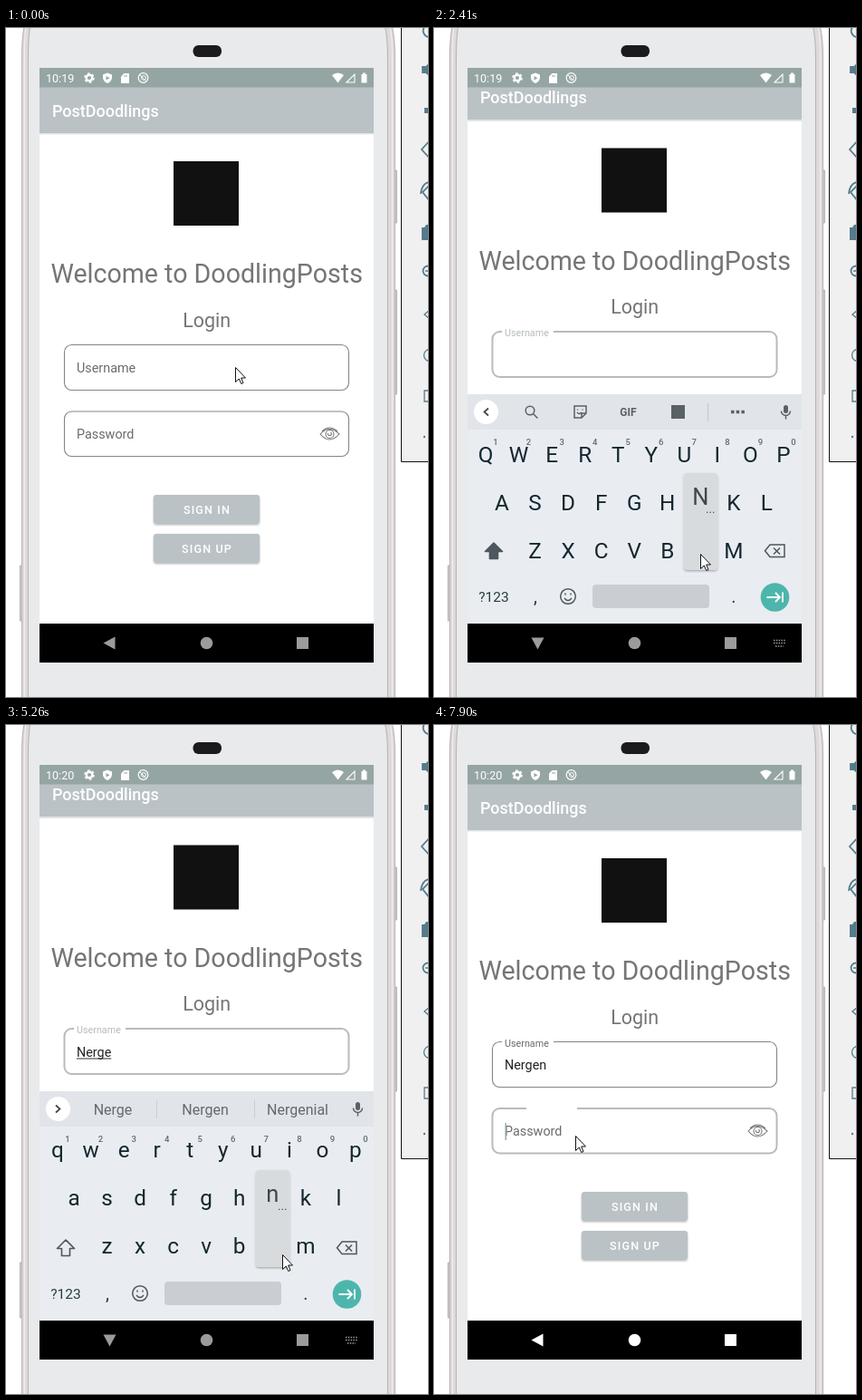
An HTML page that plays this animation: 466x738 px, repeating every 8 s.

```html
<!DOCTYPE html>
<html lang="en">
<head>
<meta charset="utf-8">
<title>Login demo</title>
<style>
html, body { margin: 0; width: 100%; height: 100%; overflow: hidden; background: #fff; }
svg { display: block; width: 466px; height: 738px; font-family: Roboto, sans-serif; }
.mid { text-anchor: middle; }
.line { fill: none; stroke-width: 1.5; }
</style>
</head>
<body>
<svg viewBox="0 0 466 738">
  <defs>
    <clipPath id="screenClip"><rect x="37" y="65" width="369" height="592"/></clipPath>
    <clipPath id="glassClip"><rect x="37" y="44" width="369" height="656"/></clipPath>
    <filter id="shadow" x="-20%" y="-20%" width="140%" height="150%">
      <feDropShadow dx="0" dy="1.2" stdDeviation="1" flood-opacity=".3"/>
    </filter>
  </defs>

  <!-- phone body -->
  <path d="M20 -3Q17 10 17 34V740H430V34Q430 10 426 -3Z" fill="#dedadb"/>
  <path d="M27 -3Q25 8 25 34V740H421V34Q421 8 418 -3Z" fill="#e8eaec"/>
  <g class="line" stroke="#b9b1b3" style="stroke-width:1">
    <path d="M20.500 -3Q17.500 10 17.500 34V740M27 -3Q24.500 8 24.500 34V740M418 -3Q421.500 8 421.500 34V740M426 -3Q429.500 10 429.500 34V740"/>
    <path d="M22 -3Q20.500 10 20.500 34V740M424 -3Q426.500 10 426.500 34V740" stroke="#f3f0f1"/>
    <path d="M17 593h-1.500v61h1.500M430 157h1.500v58h-1.500M430 289h1.500v115h-1.500" fill="#d0cacc"/>
  </g>
  <rect x="206.500" y="19" width="31.500" height="13" rx="6" fill="#1b1b1d"/>

  <!-- emulator side panel -->
  <path d="M436.500 -1V478.500H467V-1Z" fill="#f0f0f0" stroke="#111"/>
  <g fill="none" stroke="#557b8d" stroke-width="1.800">
    <path d="M462 -1A7 7 0 0 0 467 10"/>
    <path d="M460 43h4l4-4v14l-4-4h-4z" fill="#557b8d"/>
    <path d="M462 88h6v6h-6z" fill="#557b8d" stroke="none"/>
    <path d="M468 124L459 134L468 144M468 173L460 181L468 191M458 183Q459 172 467 170"/>
    <path d="M459 220h3l2-3h5v17h-10z" fill="#557b8d" stroke="none"/>
    <circle cx="466" cy="268" r="5.500"/>
    <path d="M463 268h6M468 311L462 316L468 321" stroke-width="1.300"/>
    <circle cx="468" cy="361" r="6.500" stroke-width="1.300"/>
    <path d="M469 400h-7v12h7" stroke-width="1.300"/>
    <circle cx="462" cy="451" r="1.200" fill="#557b8d" stroke="none"/>
  </g>

  <!-- page -->
  <rect x="37" y="44" width="369" height="614" fill="#fff"/>
  <g clip-path="url(#screenClip)"><g id="page">
    <rect x="37" y="60" width="369" height="56" fill="#bac2c6"/>
    <rect x="37" y="116" width="369" height="1.500" fill="#e3e6e8"/>
    <text x="51" y="97.500" font-size="17.960" font-weight="500" fill="#fff">PostDoodlings</text>
    <rect x="185" y="147" width="72" height="71" fill="#111"/>
    <g class="mid" fill="#757575">
      <text x="221.700" y="281" font-size="28.600">Welcome to DoodlingPosts</text>
      <text x="221.700" y="329.500" font-size="21.500">Login</text>
    </g>
    <rect id="userBox" x="64.500" y="349.500" width="314" height="50" rx="8" fill="none"/>
    <rect id="userGap" x="75" y="346" width="57" height="6" fill="#fff"/>
    <text id="userLabel" x="78">Username</text>
    <text id="typed" x="78" y="380" font-size="14.360" fill="#222"></text>
    <rect id="underline" x="78" y="382" height="1" fill="#333"/>
    <rect id="passBox" x="64.500" y="423" width="314" height="49.500" rx="8" fill="none"/>
    <rect id="passGap" x="102" y="420" width="56" height="6" fill="#fff"/>
    <text x="78" y="453" font-size="14.360" fill="#6b6b6b">Password</text>
    <g class="line" stroke="#777" style="stroke-width:1.100">
      <path d="M347 448Q357 437 368 448Q357 460 347 448ZM349 445Q357 437 366 445"/>
      <circle cx="357.500" cy="448" r="4.500"/><path d="M355.500 447a2 2 0 1 0 3-1"/>
    </g>
    <rect id="caret" width="1.400" height="19" fill="#8fa3ad"/>
    <g filter="url(#shadow)" fill="#bac2c6">
      <rect x="163" y="515" width="117" height="32" rx="3"/>
      <rect x="163" y="558" width="117" height="32" rx="3"/>
    </g>
    <g class="mid" font-size="12.570" font-weight="500" letter-spacing="1.120" fill="#fff">
      <text x="222" y="536">SIGN IN</text><text x="222" y="579">SIGN UP</text>
    </g>
  </g></g>

  <!-- status bar -->
  <rect x="37" y="44" width="369" height="21.500" fill="#95a5a3"/>
  <g fill="#fff">
    <text id="clock" x="44" y="59.500" font-size="12.570"></text>
    <circle cx="92" cy="55" r="3.300" fill="none" stroke="#fff" stroke-width="2.400"/>
    <circle cx="92" cy="55" r="5" fill="none" stroke="#fff" stroke-width="1.600" stroke-dasharray="2.600 2.636"/>
    <path d="M112 49.500l5 2v3.500q-.5 4-5 6q-4.500-2-5-6v-3.500z"/>
    <path d="M110.500 53l4 2.200l-4 2.200z" fill="#95a5a3"/>
    <path d="M130.500 50h5.500v11h-9v-7.500z"/><path d="M131 52v2M133 52v2" stroke="#95a5a3"/>
    <circle cx="151.500" cy="55" r="5.300" fill="none" stroke="#fff" stroke-width="1.200"/>
    <path d="M148 52l6 6" stroke="#fff"/><circle cx="152" cy="55" r="2.400" fill="none" stroke="#fff"/>
    <path d="M360 52q6.500-5 13 0l-6.500 8.500z"/>
    <path d="M376 60l9-9v9z" fill="none" stroke="#fff" stroke-width="1.100"/>
    <path d="M392.500 51h1.500v-1.500h3v1.500h1.500v9.500h-6z"/>
  </g>

  <!-- navigation bar -->
  <rect x="37" y="657" width="369" height="43" fill="#000"/>
  <rect id="ripple" x="69" y="657" width="91" height="43" rx="21.500" fill="#303030"/>
  <g id="nav">
    <path id="back" d="M-7 0L6 -7V7Z"/>
    <circle cx="221.500" cy="678.500" r="6.800"/>
    <rect x="321" y="672" width="13" height="13"/>
    <path id="imeIcon" d="M375 675.500h13M375 678.500h13M377 682h9" fill="none" stroke="#9b9b9b" stroke-width="1.500" stroke-dasharray="1.500 1.300"/>
  </g>

  <!-- keyboard -->
  <g clip-path="url(#glassClip)"><g id="keyboard">
    <rect x="37" y="404" width="369" height="253" fill="#e9edf1"/>
    <rect x="37" y="404" width="369" height="39" fill="#e1e5e9"/>
    <rect id="footer" x="37" y="641" width="369" height="16" fill="#d3d8dc"/>
    <circle cx="57.500" cy="423.500" r="13.500" fill="#fff"/>
    <path id="chevron" class="line" d="M-2.500 -4L2 0L-2.500 4" stroke="#444" style="stroke-width:1.700"/>
    <g fill="#596167">
      <rect x="386" y="416" width="5" height="9" rx="2.500"/>
      <path class="line" d="M383.500 422.500a5 5 0 0 0 10 0M388.500 428v3.500" stroke="#596167" style="fill:none"/>
    </g>
    <g id="tools" class="line" stroke="#596167">
      <circle cx="106" cy="422" r="4.800"/><path d="M109.500 425.500l5 5"/>
      <path d="M155 417h13v8l-5 5h-8zM168 425h-5v5M158 424q2.500 3 5 0M158.500 420.500v1M164 420.500v1"/>
      <text class="mid" x="214.500" y="427.500" font-size="12" font-weight="700" stroke="none" fill="#596167">GIF</text>
      <rect x="262" y="416" width="15" height="15" fill="#596167" stroke="none"/>
      <path d="M302.500 414v20" stroke="#c9ced2"/>
      <path d="M328 423.500h15" stroke-width="3.500" stroke-dasharray="3.500 2.200"/>
    </g>
    <g id="hints" class="mid" font-size="16" fill="#626a70">
      <path d="M166.500 414v20M274.500 414v20" stroke="#c9ced2"/>
      <text x="118" y="430"></text><text x="220" y="430"></text><text x="322" y="430"></text>
    </g>
    <g id="keys" class="mid" font-size="24.300" fill="#14272f"></g>
    <path id="shift" d="M66 568l9.500 9.500h-5v8h-9v-8h-5z" stroke="#4d575e" stroke-width="1.600" stroke-linejoin="round"/>
    <g class="line" stroke="#4d575e">
      <path d="M371 570h16v13.500h-16l-5.500-6.700zM375 573.500l7 7M382 573.500l-7 7"/>
      <circle cx="148" cy="627" r="8.300"/><path d="M144 629q4 5 8 0M145 623.500v2M151 623.500v2"/>
    </g>
    <g class="mid" fill="#2b3a42">
      <text x="66" y="632.500" font-size="15.500">?123</text>
      <text x="112" y="634" font-size="20">,</text><text x="331" y="634" font-size="20">.</text>
    </g>
    <rect x="175" y="614" width="129" height="26" rx="4" fill="#cacdd1"/>
    <circle cx="376.500" cy="628" r="15.800" fill="#4db6ac"/>
    <path class="line" d="M367.500 628h14M377 623l5 5l-5 5M385 622.500v11" stroke="#fff" style="stroke-width:1.800"/>
    <g id="popup" class="mid">
      <rect x="-18.500" y="-85" width="37.500" height="107" rx="4" fill="#d8dbde" filter="url(#shadow)"/>
      <text id="popupKey" y="-50" font-size="25.500" fill="#3c474e"></text>
      <text x="11" y="-41" font-size="13" fill="#3c474e">...</text>
    </g>
  </g></g>

  <path id="pointer" d="M.5 .5V16.500L4.300 13L6.800 18.500L9 17.500L6.700 12H11.500Z" fill="#fff" stroke="#111"/>
</svg>
<script>
const LOOP = 8000;
const el = id => document.getElementById(id);
const set = (id, attrs) => Object.entries(attrs).forEach(([k, v]) => el(id).setAttribute(k, v));
const show = (id, on) => { el(id).style.display = on ? '' : 'none'; };

const ticks = [
  [150, 300, 2], [580, 1500, 8], [1640, 2680, 9], [2960, 3970, 8],
  [4090, 5020, 8], [5140, 6150, 9], [6300, 7260, 8], [7380, 7900, 5]
].flatMap(([a, b, n]) => Array.from({ length: n }, (_, i) => a + (b - a) * i / (n - 1)));

const pointerPath = [
  [0, 253, 374], [300, 244, 376], [1400, 244, 376], [1800, 262, 440], [2200, 294, 575],
  [2290, 294, 580], [2550, 294, 580], [2680, 235, 524], [2960, 180, 500], [3104, 133, 478],
  [3250, 133, 478], [3393, 168, 480], [3537, 168, 480], [3681, 231, 516], [4090, 229, 520],
  [4600, 135, 478], [4754, 135, 478], [5140, 300, 582], [5266, 305, 584], [5392, 305, 584],
  [5640, 310, 440], [5900, 300, 280], [6150, 290, 300], [6560, 140, 670], [6700, 125, 714],
  [6850, 117, 682], [7000, 117, 680], [7123, 120, 664], [7260, 141, 590], [7510, 156, 453]
];
const keyboardIn = [[580, 0], [710, .62], [843, .96], [974, 1], [7123, 1], [7260, .9], [7380, .5], [7510, 0]];
const presses = [
  ['n', 2280, 2540], ['e', 3100, 3240], ['r', 3390, 3530],
  ['g', 3960, 4080], ['e', 4610, 4750], ['n', 5260, 5380]
];
const suggestions = [
  ['N', 'No', 'New'], ['Ne', 'New', 'Need'], ['Ner', 'Net', 'Nervous'],
  ['Nerg', 'Nergen', 'Nerve'], ['Nerge', 'Nergen', 'Nergenial'], ['Nergen', 'Nergens', "Nergenial's"]
];

function track(points, t, col = 1) {
  const i = points.findIndex(p => p[0] > t);
  if (i === 0) return points[0][col];
  if (i < 0) return points[points.length - 1][col];
  const a = points[i - 1], b = points[i];
  return a[col] + (b[col] - a[col]) * (t - a[0]) / (b[0] - a[0]);
}

function addText(parent, text, attrs) {
  const node = document.createElementNS('http://www.w3.org/2000/svg', 'text');
  Object.entries(attrs).forEach(([k, v]) => node.setAttribute(k, v));
  node.textContent = text;
  parent.append(node);
  return node;
}

const keys = {};
['qwertyuiop', 'asdfghjkl', 'zxcvbnm'].forEach((row, r) => [...row].forEach((key, i) => {
  const x = [57, 75, 111.5][r] + i * 36.55, y = 477 + r * 53;
  keys[key] = { x, y, node: addText(el('keys'), key, { x, y }) };
  if (r === 0) addText(el('keys'), (i + 1) % 10, { x: x + 11, y: 459.5, 'font-size': 9.5, 'font-weight': 500, fill: '#626a70' });
}));

const hintTexts = el('hints').querySelectorAll('text');

function renderPage(t, shown, word) {
  set('page', { transform: `translate(0 ${-14.5 * shown})` });
  const userFocus = t >= 580 && t < 7630, passFocus = t >= 7630;
  const floated = track([[440, 0], [710, 1]], t);
  const border = focus => focus ? { stroke: '#b6bcc0', 'stroke-width': 2 } : { stroke: '#858585', 'stroke-width': 1.1 };
  set('userBox', border(userFocus));
  set('passBox', border(passFocus));
  show('userGap', floated > .4);
  show('passGap', t >= 7890);
  set('userLabel', {
    y: 379.5 - 25 * floated, 'font-size': 14.36 - 3.59 * floated,
    fill: userFocus ? '#b6bcc0' : '#6b6b6b'
  });
  el('typed').textContent = word;
  const width = word ? el('typed').getComputedTextLength() : 0;
  set('underline', { width });
  show('underline', word && t < 7120);

  const resets = [580, ...presses.map(p => p[2]), 7120, 7630].filter(r => r <= t);
  const blinkOn = resets.length && (t - resets[resets.length - 1]) % 1000 < 500;
  show('caret', blinkOn);
  set('caret', passFocus ? { x: 78.5, y: 439 } : { x: 78.5 + width, y: 365.5 });
}

function renderKeyboard(t, shown, word) {
  show('keyboard', shown > 0);
  set('keyboard', { opacity: shown, transform: `translate(0 ${50 * (1 - shown)})` });
  show('footer', shown < 1);
  const upper = t >= 960 && !word;
  const cased = key => upper ? key.toUpperCase() : key;
  for (const key in keys) {
    keys[key].node.textContent = cased(key);
    keys[key].node.setAttribute('y', keys[key].y + (upper ? 2 : 0));
  }
  set('shift', { fill: upper ? '#4d575e' : 'none' });
  set('chevron', { transform: `translate(57.5 423.5) scale(${word ? 1 : -1} 1)` });
  show('tools', !word);
  show('hints', word && t < 7120);
  if (word) hintTexts.forEach((node, i) => { node.textContent = suggestions[word.length - 1][i]; });

  const press = presses.find(p => t >= p[1] && t < p[2]);
  show('popup', press);
  if (press) {
    const { x, y } = keys[press[0]];
    set('popup', { transform: `translate(${x} ${y - 7})` });
    el('popupKey').textContent = cased(press[0]);
  }
}

function renderNav(t, shown) {
  set('nav', { fill: t >= 7370 ? '#fff' : t >= 6980 ? '#dcdcdc' : '#9b9b9b' });
  set('back', { transform: `translate(114.500 678.500) rotate(${-90 * shown})` });
  show('imeIcon', t >= 700 && t < 7200);
  show('ripple', t >= 6980 && t < 7500);
}

function render(time) {
  const t = ticks.filter(k => k <= time + 16).pop() || 0;
  const shown = track(keyboardIn, t);
  const letters = presses.filter(p => t >= p[2]).map(p => p[0]).join('');
  const word = letters.charAt(0).toUpperCase() + letters.slice(1);
  el('clock').textContent = t < 4480 ? '10:19' : '10:20';
  renderPage(t, shown, word);
  renderKeyboard(t, shown, word);
  renderNav(t, shown);
  set('pointer', { transform: `translate(${track(pointerPath, t)} ${track(pointerPath, t, 2)})` });
}

const start = performance.now();
function frame() {
  render((performance.now() - start) % LOOP);
  requestAnimationFrame(frame);
}
frame();
</script>
</body>
</html>
```
